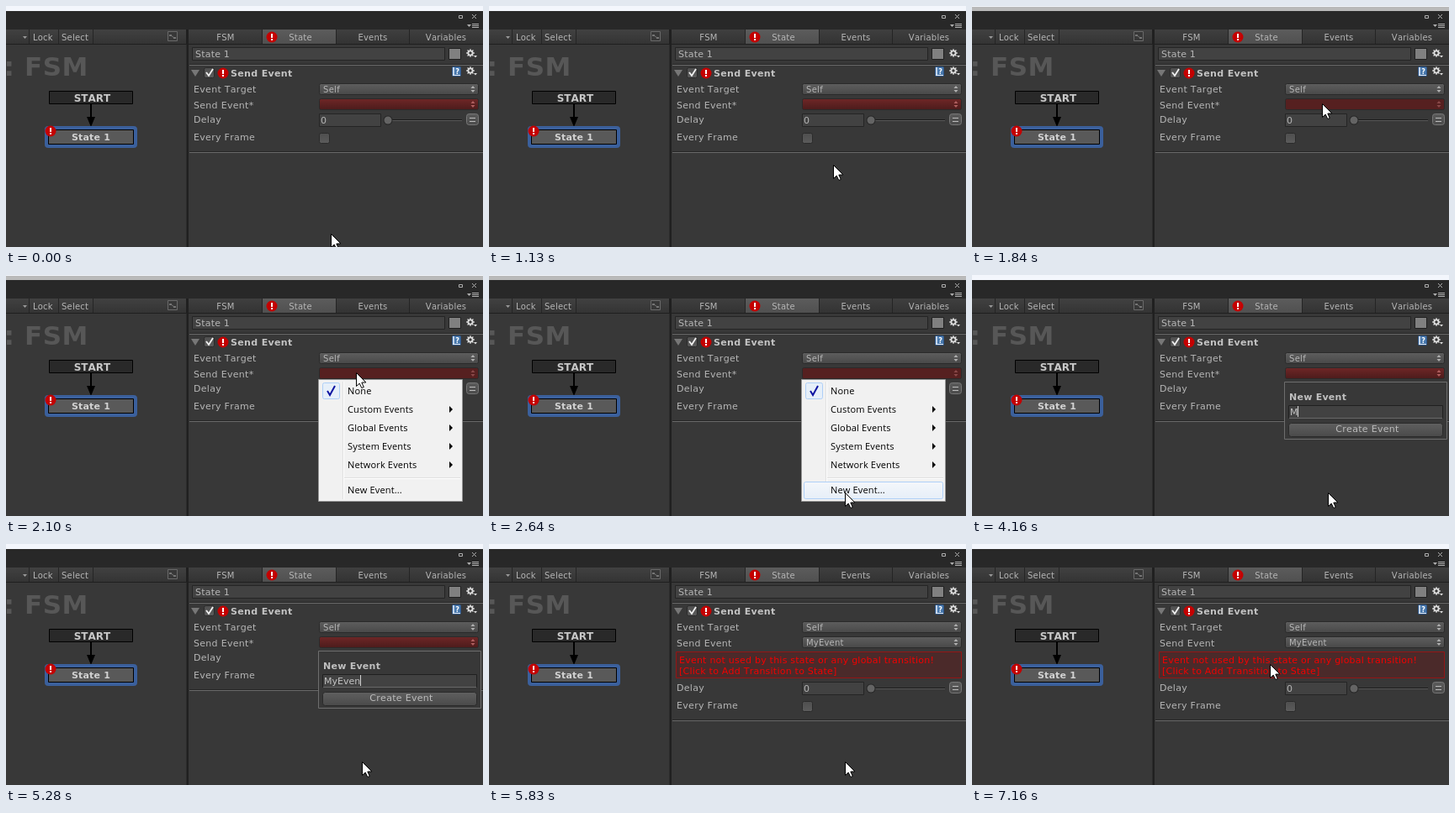
Animation, 567 px wide and 287 px high, one loop 8000 ms. Source, as an HTML page with a canvas:

```html
<!DOCTYPE html>
<html lang="en">
<head>
<meta charset="utf-8">
<title>State inspector</title>
<style>
html, body { margin: 0; width: 100%; height: 100%; overflow: hidden; background: #383838; }
canvas { display: block; }
</style>
</head>
<body>
<canvas id="stage" width="567" height="287"></canvas>
<script>
const ctx = document.getElementById('stage').getContext('2d');
const LOOP = 8000;
const UI = '"DejaVu Sans", sans-serif';
const MENU = '"Open Sans", sans-serif';
const LABEL = '#b6b6b6';
const CONTROL = '#b0b0b0';

// Pointer tip: [time, x, y]
const pointerSteps = [
  [0, 386, 271], [590, 389, 269], [710, 391, 267], [860, 397, 255], [990, 406, 234],
  [1130, 409, 189], [1280, 413, 145], [1410, 416, 118], [1550, 416, 116],
  [2260, 417, 159], [2400, 420, 207], [2520, 423, 268], [2640, 423, 259],
  [6700, 437, 256], [6860, 366, 157], [7010, 358, 148], [7160, 354, 143]
];
const keyTimes = [4160, 4430, 4710, 5010, 5140, 5280, 5560];
const eventName = 'MyEvent';
const menuItems = ['None', 'Custom Events', 'Global Events', 'System Events', 'Network Events', 'New Event...'];

function rect(x, y, w, h, fill) {
  ctx.fillStyle = fill;
  ctx.fillRect(x, y, w, h);
}

function shade(y, h, top, bottom) {
  const g = ctx.createLinearGradient(0, y, 0, y + h);
  g.addColorStop(0, top);
  g.addColorStop(1, bottom);
  return g;
}

function box(x, y, w, h, fill, border, r = 0) {
  ctx.beginPath();
  ctx.roundRect(x + 0.5, y + 0.5, w - 1, h - 1, r);
  ctx.fillStyle = fill;
  ctx.fill();
  ctx.strokeStyle = border;
  ctx.lineWidth = 1;
  ctx.stroke();
}

function poly(points, fill) {
  ctx.beginPath();
  points.forEach(([x, y]) => ctx.lineTo(x, y));
  ctx.closePath();
  ctx.fillStyle = fill;
  ctx.fill();
}

function line(points, color, width) {
  ctx.beginPath();
  points.forEach(([x, y]) => ctx.lineTo(x, y));
  ctx.strokeStyle = color;
  ctx.lineWidth = width;
  ctx.stroke();
}

function disc(x, y, r, fill) {
  ctx.beginPath();
  ctx.arc(x, y, r, 0, Math.PI * 2);
  ctx.fillStyle = fill;
  ctx.fill();
}

function text(str, x, y, { size = 11, color = LABEL, weight = 400, gap = 0.3, align = 'left', family = UI } = {}) {
  ctx.font = `${weight} ${size}px ${family}`;
  ctx.letterSpacing = gap + 'px';
  ctx.fontKerning = 'none';
  ctx.textAlign = align;
  ctx.fillStyle = color;
  ctx.fillText(str, x, y);
}

function alertBadge(x, y) {
  disc(x, y, 6.5, '#c40000');
  rect(x - 1, y - 4, 2, 5, '#fff');
  rect(x - 1, y + 2, 2, 2, '#fff');
}

function gear(x, y) {
  ctx.strokeStyle = '#dedede';
  ctx.lineWidth = 1.8;
  ctx.beginPath();
  ctx.arc(x, y, 2.6, 0, Math.PI * 2);
  ctx.stroke();
  for (let i = 0; i < 8; i++) {
    const c = Math.cos(i * Math.PI / 4), s = Math.sin(i * Math.PI / 4);
    line([[x + c * 3, y + s * 3], [x + c * 4.8, y + s * 4.8]], '#dedede', 1.4);
  }
  poly([[x + 4, y + 3], [x + 8, y + 3], [x + 6, y + 5.5]], '#dedede');
}

function divider(y) {
  rect(218, y - 1, 349, 1, '#262626');
  rect(218, y, 349, 1, '#6a6a6a');
}

function checkbox(x, y) {
  box(x, y, 13, 13, shade(y, 13, '#4e4e4e', '#5c5c5c'), '#2a2a2a', 2);
}

function dropdown(y, top, bottom, arrow = CONTROL) {
  box(372, y, 190, 14, shade(y, 14, top, bottom), '#2a2a2a', 2);
  poly([[552.5, y + 6], [557.5, y + 6], [555, y + 3]], arrow);
  poly([[552.5, y + 8], [557.5, y + 8], [555, y + 11]], arrow);
}

function windowFrame(dimmed) {
  rect(0, 0, 567, 287, '#383838');
  rect(0, 0, 567, 6, '#f3f6fc');
  if (dimmed) rect(0, 1, 567, 5, '#b9b9b9');
  rect(0, 6, 567, 22, '#282828');
  box(538, 11, 5, 4, '#282828', CONTROL);
  line([[554, 10], [559, 15]], CONTROL, 1);
  line([[559, 10], [554, 15]], CONTROL, 1);
  poly([[548, 22], [553, 22], [550.5, 25]], CONTROL);
  for (let y = 21; y < 27; y += 2) rect(554, y, 8, 1, CONTROL);
}

function graphPanel() {
  rect(0, 28, 214, 17, shade(28, 17, '#414141', '#343434'));
  rect(0, 45, 214, 1, '#1f1f1f');
  for (const x of [27, 62, 103]) rect(x, 28, 1, 17, '#252525');
  poly([[20, 36], [25, 36], [22.5, 39]], '#9a9a9a');
  const bar = { size: 10, gap: 0.2 };
  text('Lock', 32, 41, bar);
  text('Select', 66, 41, bar);
  box(192, 30, 12, 12, '#383838', '#6a6a6a');
  rect(194, 34, 3, 2, '#757575');
  rect(199, 37, 3, 2, '#757575');
  line([[196, 35], [200, 38]], '#757575', 1);

  text(': FSM', -2.5, 83, { size: 31, weight: 700, color: '#575757', gap: 0.6 });

  const node = { weight: 700, align: 'center' };
  box(51, 101, 100, 16, '#292929', '#000');
  text('START', 102.5, 114, { ...node, size: 12, gap: 0, color: '#c8c8c8' });
  rect(100, 117, 2, 17, '#000');
  poly([[96, 132], [106, 132], [101, 144]], '#000');
  box(46, 143, 110, 26, '#3b609c', '#3b609c', 3);
  box(50, 147, 102, 18, '#595959', '#000');
  text('State 1', 101, 160, { ...node, gap: 0.2, color: '#d2d2d2' });
  alertBadge(53, 149);

  rect(214, 28, 3, 259, '#202020');
  rect(214, 46, 1, 241, '#2b2b2b');
}

function helpBook(x, y) {
  box(x, y, 11, 12, '#4878ad', '#2f5688', 1);
  rect(x + 1, y + 1, 2, 10, '#c3d5ea');
  rect(x + 1, y + 10, 9, 1, '#e6edf5');
  text('?', x + 6.5, y + 9, { size: 8, weight: 700, color: '#fff', align: 'center', gap: 0 });
}

function inspectorHeader() {
  rect(217, 28, 350, 17, shade(28, 17, '#3f3f3f', '#333333'));
  rect(305, 28, 87, 17, shade(28, 17, '#5c5c5c', '#505050'));
  for (const x of [304, 392, 479]) rect(x, 28, 1, 17, '#242424');
  rect(217, 45, 350, 1, '#1f1f1f');
  const tab = { size: 10, gap: 0.2, align: 'center' };
  [['FSM', 261], ['State', 350], ['Events', 436], ['Variables', 523]].forEach(([s, x]) => text(s, x, 41, tab));
  alertBadge(316, 37);

  box(221, 49, 301, 16, '#424242', '#242424');
  text('State 1', 225, 61, { gap: 0.2 });
  box(526, 50, 15, 14, '#808080', '#202020');
  gear(552, 56);
  divider(70);

  poly([[220, 76], [230, 76], [225, 84]], '#777');
  checkbox(235, 73);
  line([[238, 79], [241, 83], [246, 75]], '#f2f2f2', 1.8);
  alertBadge(258, 80);
  text('Send Event', 267, 84, { weight: 700, color: '#c4c4c4', gap: 0.35 });
  helpBook(530, 72);
  gear(552, 77);
}

function delayRows(dy) {
  ctx.save();
  ctx.translate(0, dy);
  text('Delay', 223, 139);
  box(372, 128, 74, 16, '#424242', '#242424');
  text('0', 374, 140);
  rect(459, 135, 83, 1, '#1c1c1c');
  rect(459, 136, 83, 1, '#5a5a5a');
  disc(454, 136, 5.5, '#262626');
  disc(454, 136, 4.5, '#646464');
  box(547, 128, 15, 14, shade(128, 14, '#5c5c5c', '#4a4a4a'), '#777', 3);
  rect(551, 133, 7, 1, '#bdbdbd');
  rect(551, 137, 7, 1, '#bdbdbd');
  text('Every Frame', 223, 160);
  checkbox(372, 151);
  divider(174);
  ctx.restore();
}

function inspectorFields(t) {
  const created = t >= 5830;
  const pressed = t >= 1840 && t < 3220;
  text('Event Target', 223, 103);
  dropdown(92, '#5f5f5f', '#484848');
  text('Self', 377, 103, { size: 10 });
  text(created ? 'Send Event' : 'Send Event*', 223, 122);
  if (created) {
    dropdown(110, '#5f5f5f', '#484848');
    text('MyEvent', 377, 121, { size: 10, gap: 0.2 });
    box(222, 128, 340, 32, '#4b2a2a', '#951515');
    const warn = { color: '#f20000', gap: 0.23 };
    text('Event not used by this state or any global transition!', 226, 142, warn);
    text('[Click to Add Transition to State]', 226, 155, warn);
  } else if (pressed) {
    dropdown(110, '#562020', '#562020', '#8a4a4a');
  } else {
    dropdown(110, '#702727', '#4b1b1b', '#b06060');
  }
  delayRows(created ? 36 : 0);
}

function hover(y) {
  box(374, y, 166, 21, shade(y, 21, '#f4f7fb', '#e6eef8'), '#aecff7', 2);
}

function contextMenu(tipY) {
  box(371, 124, 172, 146, '#f1f1f1', '#979797');
  rect(400, 127, 1, 140, '#e0e0e0');
  rect(401, 127, 1, 140, '#fff');
  rect(402, 241, 138, 1, '#e0e0e0');
  rect(402, 242, 138, 1, '#fff');
  const row = tipY >= 245 ? 5 : Math.floor((tipY - 127) / 22);
  if (row >= 0) hover(row === 5 ? 246 : 127 + row * 22);
  box(376, 128, 21, 20, '#e6eff9', '#aecff7', 2);
  line([[382, 138], [385, 143], [391, 132]], '#0c12a1', 2);
  menuItems.forEach((item, i) => {
    const y = i === 5 ? 260 : 142 + i * 22;
    text(item, 406, y, { color: '#000', gap: 0.15, family: MENU });
    if (i > 0 && i < 5) poly([[527, y - 8], [531, y - 4], [527, y]], '#000');
  });
}

function eventPopup(t) {
  const typed = eventName.slice(0, keyTimes.filter(k => t >= k).length);
  box(371, 127, 194, 69, '#383838', '#6e6e6e');
  text('New Event', 377, 149, { weight: 700, color: '#c0c0c0', gap: 0.25 });
  box(376, 155, 184, 16, '#424242', '#202020');
  rect(377, 170, 182, 1, '#686868');
  text(typed, 378, 167, { gap: 0, color: '#c4c4c4' });
  rect(Math.round(378 + ctx.measureText(typed).width), 156, 1, 13, '#d0d0d0');
  const ready = typed.length > 0;
  box(376, 176, 184, 17, ready ? shade(176, 17, '#606060', '#494949') : shade(176, 17, '#494949', '#3f3f3f'), '#2a2a2a', 3);
  text('Create Event', 470, 187, { align: 'center', color: ready ? '#bcbcbc' : '#757575' });
}

function pointer(x, y) {
  const shape = [[0, 0], [0, 16], [3.7, 12.6], [6.3, 18], [8.8, 17], [6.3, 11.6], [11.4, 11.4]];
  const points = shape.map(([px, py]) => [x + px + 0.5, y + py + 0.5]);
  poly(points, '#fff');
  line([...points, points[0]], '#000', 1);
}

function draw(t) {
  const [, x, y] = pointerSteps.findLast(s => t >= s[0]);
  windowFrame(t >= 1840 && t < 3070);
  graphPanel();
  inspectorHeader();
  inspectorFields(t);
  if (t >= 2100 && t < 3070) contextMenu(y);
  if (t >= 3220 && t < 5830) eventPopup(t);
  pointer(x, y);
}

const start = performance.now();
function tick() {
  draw((performance.now() - start) % LOOP);
  requestAnimationFrame(tick);
}
tick();
</script>
</body>
</html>
```
